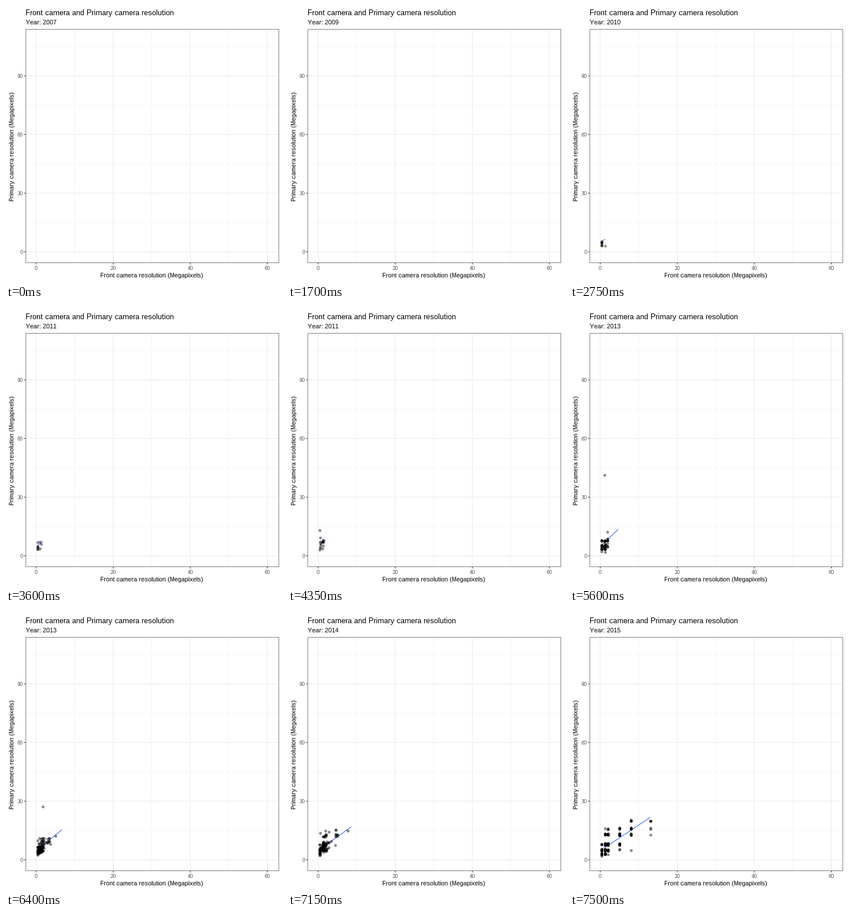
Animation of 480x480 px, one loop 8 s. Source, as a matplotlib script:

```python
import numpy as np
import matplotlib.pyplot as plt
from matplotlib.animation import FuncAnimation
from matplotlib.patches import Rectangle

SIZE, DPI, STEP_MS, FRAMES = 480, 72, 50, 160
PERIOD, FIRST = 19, 47        # frames per year, last still frame before data
BLUE, ALPHA = "#3366FF", 0.4

# Usual sensor sizes in megapixels
FRONT = np.array([.3, 1.3, 2, 5, 8, 13])
MAIN = np.array([2, 3.15, 5, 8, 13, 16, 20, 23])

# year: phones, mean and spread of front rank, top front rank, trend slope
YEARS = {
    2010: (9, .2, .5, 1, 1.4),
    2011: (16, .6, .6, 2, 1.6),
    2012: (72, .7, .6, 2, 1.9),
    2013: (140, .7, .8, 3, 1.9),
    2014: (120, 1.1, 1.1, 4, 1.44),
    2015: (230, 1.8, 1.4, 5, 1.31),
}

plt.rcParams.update({"font.family": "Liberation Sans",
                     "text.hinting": "default", "text.hinting_factor": 1})
rng = np.random.default_rng(7)


def px(x):
    return 52.5 + 6.7 * np.asarray(x)


def py(y):
    return 427.5 - 3.4 * np.asarray(y)


def phones(year):
    """Main camera rank rises with front rank; y is jittered."""
    count, mean, spread, top, _ = YEARS[year]
    front = np.clip(np.rint(rng.normal(mean, spread, count)), 0, top)
    main = np.rint(rng.normal(1.8 + .65 * front, .75))
    main = np.clip(main, 0, len(MAIN) - 1)
    rows = np.column_stack([FRONT[front.astype(int)], MAIN[main.astype(int)]])
    rows[:, 1] += rng.uniform(-.42, .42, count)
    if year in (2012, 2013):
        rows[0] = FRONT[year - 2012], 41.3
    return rows


def trend(year):
    *_, top, slope = YEARS[year]
    x = FRONT[[0, top]]
    return np.column_stack([x, 4.7 + slope * x])


clouds = [phones(y) for y in YEARS]
trends = [trend(y) for y in YEARS]

fig = plt.figure(figsize=(SIZE / DPI, SIZE / DPI), dpi=DPI, facecolor="white")
ax = fig.add_axes([0, 0, 1, 1])
ax.set(xlim=(0, SIZE), ylim=(SIZE, 0))
ax.axis("off")

L, T, R, B = 34.5, 40.5, 474.5, 446.5


def rule(xs, ys, color, width=1.07):
    ax.plot(xs, ys, color=color, lw=width, solid_capstyle="butt", zorder=1,
            snap=False)


def label(x, y, s, size, color="black", **kw):
    return ax.text(x, y, s, fontsize=size, color=color, **kw)


for v in range(10, 60, 20):
    rule([px(v)] * 2, [T, B], "#EBEBEB", .53)
for v in range(15, 110, 30):
    rule([L, R], [py(v)] * 2, "#EBEBEB", .53)
for v in range(0, 61, 20):
    rule([px(v)] * 2, [T, B], "#EBEBEB")
    rule([px(v)] * 2, [B, B + 3], "#333333")
    label(px(v), 459, str(v), 9, "#4D4D4D", ha="center")
for v in range(0, 91, 30):
    rule([L, R], [py(v)] * 2, "#EBEBEB")
    rule([L - 3, L], [py(v)] * 2, "#333333")
    label(29.6, py(v) + 3.3, str(v), 9, "#4D4D4D", ha="right")
ax.add_patch(Rectangle((L, T), R - L, B - T, fill=False, ec="#808080",
                       lw=1, zorder=4, snap=False))

label(34.3, 16, "Front camera and Primary camera resolution", 13)
subtitle = label(34.3, 32, "", 11)
label(254, 471.5, "Front camera resolution (Megapixels)", 11, ha="center")
label(14.5, 243.8, "Primary camera resolution (Megapixels)", 11, ha="center",
      rotation=90, rotation_mode="anchor")

line, = ax.plot([], [], color=BLUE, lw=1.1, solid_capstyle="butt", zorder=2)
dots = ax.scatter([], [], s=15.3, c="black", edgecolors="black", lw=.94,
                  alpha=ALPHA, zorder=3)


def blend(a, b, f):
    """Unmatched rows leave at once; new rows appear on arrival."""
    if f == 0:
        return a
    if f == 1:
        return b
    m = min(len(a), len(b))
    return (1 - f) * a[:m] + f * b[:m]


def draw(i):
    subtitle.set_text(f"Year: {2007 + (i + 4) // PERIOD}")
    n, k = divmod(i - FIRST, PERIOD)
    steps = 8 if n == len(clouds) - 1 else 9
    f = min(1, k / steps)
    fade = 0 if n < 0 else f if n == 0 else 1
    n = max(n, 0)
    prev = max(n - 1, 0)
    dots.set_offsets(np.column_stack([
        px(blend(clouds[prev], clouds[n], f)[:, 0]),
        py(blend(clouds[prev], clouds[n], f)[:, 1])]))
    fit = blend(trends[prev], trends[n], f)
    line.set_data(px(fit[:, 0]), py(fit[:, 1]))
    dots.set_alpha(ALPHA * fade)
    line.set_alpha(fade)
    return subtitle, line, dots


anim = FuncAnimation(fig, draw, frames=FRAMES, interval=STEP_MS, repeat=True,
                     repeat_delay=0, blit=False)
plt.show()
```
